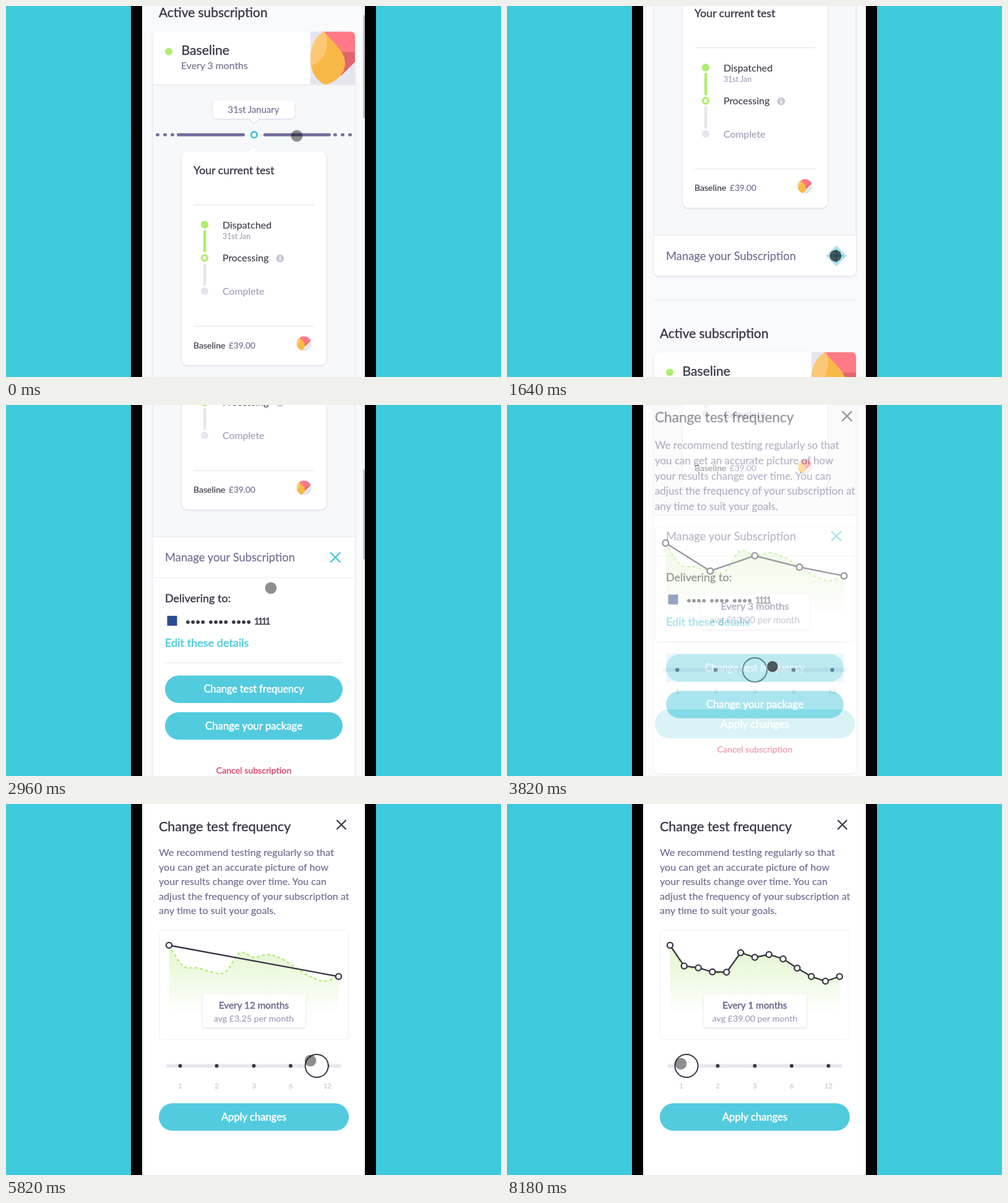
These frames come from a looping animation (800x600 px, 9.18 s). An HTML page:

```html
<!DOCTYPE html>
<html lang="en">
<head>
<meta charset="utf-8">
<title>Subscription settings</title>
<style>
  html, body { margin: 0; width: 100%; height: 100%; overflow: hidden; background: #3dcadc; }
  svg { display: block; width: 800px; height: 600px; }
  text { font-family: Lato, "Open Sans", sans-serif; stroke-linejoin: round; white-space: pre; }
  .shade { filter: drop-shadow(0 1px 1.5px rgba(70, 70, 120, .2)); }
</style>
</head>
<body>
<svg id="stage" viewBox="0 0 800 600"></svg>
<script>
const LOOP = 9180;
const INK = '#3a3747', MUTED = '#6d6a8f', PALE = '#9d9cb6', TEAL = '#52cbde',
      LIME = '#aeee70', RULE = '#e5e6ee', GREY = '#e6e5ec';
const PANEL = 351.5;

// Markup helpers; bold is an outline width that thickens the regular face.
const text = (x, y, size, fill, str, bold = 0, anchor = 'start', extra = '') =>
  `<text x="${x}" y="${y}" font-size="${size}" fill="${fill}" stroke="${fill}" stroke-width="${bold}" text-anchor="${anchor}" ${extra}>${str}</text>`;
const rect = (x, y, w, h, fill, rx = 0, extra = '') =>
  `<rect x="${x}" y="${y}" width="${w}" height="${h}" rx="${rx}" fill="${fill}" ${extra}/>`;
const dot = (x, y, r, fill, extra = '') =>
  `<circle cx="${x}" cy="${y}" r="${r}" fill="${fill}" ${extra}/>`;
const rule = (x1, x2, y, color = RULE) => rect(x1, y - .6, x2 - x1, 1.2, color);
const path = (d, fill, extra = '') => `<path d="${d}" fill="${fill}" ${extra}/>`;
const range = n => [...Array(n).keys()];

const art = `
  <g clip-path="url(#artClip)">
    ${rect(492, 42, 72, 86.5, '#e6e5ef')}
    ${path('M512 42H564V91L541 114Z', '#ff7986')}
    ${path('M541 75H564V91L541 114Z', '#e3646f')}
    ${path('M514 42C499 50 492 68 492 86C492 104 500 122 516 128C534 124 548 110 548 93C548 74 530 62 514 42Z', '#f9b947')}
    ${path('M514 42C499 50 492 68 492 86Q492 92 493.5 97C512 90 523 72 517.5 46Z', '#fdc978')}
    ${path('M514 42C499 50 492 68 492 86C492 104 500 122 516 128C534 124 548 110 548 93C548 74 530 62 514 42Z', 'url(#grain)')}
  </g>`;

const head = `
  ${text(247, 19, 20.9, INK, 'Active subscription', .4)}
  ${dot(263, 74.5, 6, LIME)}
  ${text(283.5, 80, 21.2, INK, 'Baseline', .35)}
  ${text(283, 102.5, 15.8, MUTED, 'Every 3 months', .1)}
  ${art}`;

const timeline = `
  <g class="shade">${path('M339.5 153H461.5Q466.5 153 466.5 158V178Q466.5 183 461.5 183H408L401 189.5L394 183H339.5Q334.5 183 334.5 178V158Q334.5 153 339.5 153Z', '#fff')}</g>
  ${text(400, 174, 14.9, MUTED, '31st January', .1, 'middle')}
  ${[245, 257, 269, 532, 544, 556].map(x => rect(x - 3, 206.5, 6, 5, '#716f9c', 2.5)).join('')}
  ${rect(276, 206.5, 110, 5, '#716f9c', 2.2)}${rect(416, 206.5, 109, 5, '#716f9c', 2.2)}
  ${dot(401, 209, 4.7, '#fff', `stroke="#48c6da" stroke-width="3"`)}`;

const testCard = `
  <g class="shade">
    ${rect(284, 236, 234, 345.5, '#fff', 9)}
    ${path('M392 236.5L400 228.5L408 236.5Z', '#fff')}
  </g>
  ${text(303, 273, 17.8, INK, 'Your current test', .35)}
  ${rule(303.5, 498, 322.5)}
  ${rect(319, 363, 4.5, 36.5, LIME, 2)}${rect(319, 417, 4.5, 36.5, GREY, 2)}
  ${dot(321, 354.5, 6.2, LIME)}
  ${dot(321, 408.3, 4.6, '#fff', `stroke="${LIME}" stroke-width="3.2"`)}
  ${dot(321, 461.8, 6, GREY)}
  ${text(350, 360.5, 16, INK, 'Dispatched', .1)}
  ${text(350, 378, 12.4, PALE, '31st Jan', .1)}
  ${text(350, 414, 15.9, INK, 'Processing', .1)}
  ${dot(443, 409, 6.4, '#cbcad5')}${dot(443, 406, 1, '#fff')}${rect(442, 408, 2, 4.5, '#fff')}
  ${text(350, 467.8, 15.9, PALE, 'Complete', .1)}
  ${rule(303.5, 498, 518.5)}
  ${text(303, 554.3, 14.1, INK, 'Baseline', .15)}
  ${text(360, 554.3, 13.7, MUTED, '£39.00', .1)}
  <g clip-path="url(#badgeClip)">
    ${rect(469, 534, 26, 26, GREY)}
    ${path('M472 534H495V540L481 553Z', '#ff7986')}
    ${path('M483 547L493 541L481 553Z', '#e3646f')}
    ${path('M474 537C479 542 484 545 483 551Q481 557 475 559H468V537Z', '#f9b947')}
    ${path('M474 537H468V550C474 548 476 543 474 537Z', '#fdc978')}
  </g>`;

const button = (y, label, size) =>
  rect(257, y, 287, 44.5, TEAL, 22.2) + text(400.5, y + 28, size, '#fff', label, .5, 'middle');

const panel = `
  <g clip-path="url(#panelClip)">
    ${rule(238, 563, 691.5)}
    ${text(257, 732, 18, INK, 'Delivering to:', .4)}
    ${rect(260.5, 753.5, 16, 16, '#2b4a94')}
    ${range(12).map(i => dot(294 + 8.1 * (i % 4) + 37 * Math.floor(i / 4), 763.6, 2.9, INK)).join('')}
    ${text(400.5, 768, 16, INK, '1111', .3, 'start', 'letter-spacing="-3.3"')}
    ${text(257, 804, 18.1, TEAL, 'Edit these details', .6)}
    ${rule(257, 544, 829.5)}
    ${button(850, 'Change test frequency', 16.3)}
    ${button(909.3, 'Change your package', 16.8)}
    ${rect(257, 849, 287, 46, '#a9dde8', 0, 'id="tap" opacity="0"')}
    ${text(400.5, 1008.5, 14.2, '#d9476a', 'Cancel subscription', .4, 'middle')}
  </g>`;

const page = `
  ${rect(220, 0, 360, 600, '#f9fafc')}
  <g id="page">
    <g class="shade">${rect(237.5, 42, 326.5, 650, '#fff', 8, 'id="card"')}</g>
    <g id="head">${head}</g>
    ${rect(237.5, 128, 326.5, 497.5, '#f7f8fa')}
    ${rule(237.5, 564, 128.5)}${rule(237.5, 564, 625.5)}
    ${rect(237, 128, 1, 498, '#ecedf3')}${rect(563.3, 128, 1, 498, '#ecedf3')}
    ${timeline}${testCard}
    ${text(257, 666, 18.4, MUTED, 'Manage your Subscription', .1)}
    <g id="icon">
      ${rect(-12, -12, 24, 24, '#b4e2ee', 0, 'id="glow" transform="rotate(45)"')}
      <path d="M-11.3 0H11.3M0 -11.3V11.3" stroke="${TEAL}" stroke-width="2.5"/>
    </g>
    ${panel}
    <g id="next">
      ${rule(237.5, 564, 730.5)}
      <g class="shade">${rect(237.5, 815, 326.5, 650, '#fff', 8)}</g>
      <use href="#head" y="773"/>
    </g>
  </g>
  ${rect(577, 14, 3, 167, '#c3c3c8', 1.5, 'id="bar"')}`;

// Chart: one reading per month.
const readings = [228.5, 262, 265, 271.5, 272, 240.5, 248, 243.5, 250.5, 265.5, 279, 286.5, 279]
  .map((y, i) => [263.5 + i * 274 / 12, y]);
const steps = [[1, 281.5], [2, 340.5], [3, 400.5], [6, 460], [12, 519.5]];

function smoothPath(p) {
  let d = 'M' + p[0];
  for (let i = 0; i < p.length - 1; i++) {
    const a = p[i - 1] || p[i], b = p[i], c = p[i + 1], e = p[i + 2] || c;
    d += `C${b[0] + (c[0] - a[0]) / 6} ${b[1] + (c[1] - a[1]) / 6} ${c[0] - (e[0] - b[0]) / 6} ${c[1] - (e[1] - b[1]) / 6} ${c}`;
  }
  return d;
}
const curve = smoothPath(readings);

const advice = ['We recommend testing regularly so that', 'you can get an accurate picture of how',
  'your results change over time. You can', 'adjust the frequency of your subscription at',
  'any time to suit your goals.'];

const modal = `
  <g id="modal">
    ${rect(200, -40, 400, 680, '#fff')}
    ${text(247, 43.5, 21.5, INK, 'Change test frequency', .4)}
    <path d="M534.5 26L549.5 41M549.5 26L534.5 41" stroke="${INK}" stroke-width="2.2"/>
    ${advice.map((s, i) => text(247, 84.3 + 23.4 * i, 16.15, MUTED, s, .15)).join('')}
    ${rect(247.5, 203.5, 306, 177.5, '#fff', 5, 'stroke="#eef3f5" stroke-width="1.2"')}
    ${path(curve + 'V338H263.5Z', 'url(#fade)')}
    ${path(curve, 'none', `stroke="${LIME}" stroke-width="2.3" stroke-dasharray="4.6 4"`)}
    <g id="plot" stroke="${INK}" stroke-width="2.3" fill="#fff"></g>
    <g class="shade">${rect(318, 307.5, 166.5, 54, '#fff', 4)}</g>
    ${text(400.5, 330.5, 15.3, MUTED, '', .5, 'middle', 'id="every"')}
    ${text(400.5, 352, 14.2, PALE, '', .15, 'middle', 'id="price"')}
    ${rect(259, 420.5, 283, 6, '#e8e7ef', 3)}
    ${steps.map(([n, x]) => dot(x, 423.5, 3, INK) + text(x, 460.3, 11.3, '#c6c5cf', n, .15, 'middle')).join('')}
    ${dot(0, 423.5, 18.6, '#fff', `id="knob" stroke="${INK}" stroke-width="2"`)}
    ${rect(247, 484, 307, 44.5, TEAL, 22.2, 'id="apply"')}
    ${text(400.5, 512.3, 16.6, '#fff', 'Apply changes', .5, 'middle')}
  </g>`;

document.getElementById('stage').innerHTML = `
  <defs>
    <clipPath id="screen">${rect(220, 0, 360, 600, '#000')}</clipPath>
    <clipPath id="artClip"><path d="M490 42H556Q564 42 564 50V128.5H490Z"/></clipPath>
    <clipPath id="badgeClip">${dot(481.7, 546.7, 11.8, '#000')}</clipPath>
    <clipPath id="panelClip">${rect(237, 691, 328, 0, '#000', 0, 'id="panelBox"')}</clipPath>
    <pattern id="grain" width="5" height="5" patternUnits="userSpaceOnUse" patternTransform="rotate(30)">
      ${dot(1.5, 1.5, .6, '#d99a3a', 'opacity=".55"')}
    </pattern>
    <linearGradient id="fade" gradientUnits="userSpaceOnUse" x1="0" x2="0" y1="228" y2="338">
      <stop offset="0" stop-color="#e4f7d0"/><stop offset=".45" stop-color="#eefae2"/>
      <stop offset="1" stop-color="#fff"/>
    </linearGradient>
  </defs>
  ${rect(0, 0, 800, 600, '#3dcadc')}
  ${rect(202, 0, 396, 600, '#000')}
  <g clip-path="url(#screen)">${page}${modal}</g>
  ${dot(0, 0, 9.4, '#000', 'id="cursor"')}`;

const $ = id => document.getElementById(id);
const set = (id, name, value) => $(id).setAttribute(name, value);
const clamp = v => Math.min(1, Math.max(0, v));
const part = (t, a, b) => clamp((t - a) / (b - a));
const smooth = p => p * p * (3 - 2 * p);
const easeOut = p => 1 - (1 - p) ** 3;

// Eased value at t from rows of [time, ...values].
function track(t, rows, col = 1) {
  const i = rows.findIndex(r => r[0] > t);
  if (i < 0) return rows[rows.length - 1][col];
  if (i === 0) return rows[0][col];
  const a = rows[i - 1], b = rows[i];
  return a[col] + (b[col] - a[col]) * smooth(part(t, a[0], b[0]));
}

const cursorRows = [[0, 470, 210], [260, 476, 105], [650, 480, 112], [1450, 531, 404], [1800, 531, 404],
  [2350, 438, 453], [2400, 438, 453], [2960, 428, 296], [3120, 428, 288], [3560, 429, 423], [4000, 429, 423],
  [4550, 391, 418], [4750, 391, 418], [5200, 450, 416], [5500, 451, 415], [6000, 509, 415],
  [6230, 509, 416], [8030, 281, 420]];
const knobRows = [[4750, 400.5], [5200, 460], [5500, 460.5], [6000, 519.5], [6230, 519.5], [8030, 290]];
const barRows = [[1100, 1], [1400, 0], [2420, 0], [2540, 1], [3350, 1], [3600, 0]];

const scrollAt = t => 255 * easeOut(part(t, 0, 1000))
  + 157 * part(t, 2400, 2960) ** 2 + 35 * easeOut(part(t, 2960, 3150));

let shown = 0;
function plan(n) {
  if (n === shown) return;
  shown = n;
  const pts = readings.filter((_, i) => i % n === 0);
  $('plot').innerHTML = `<polyline points="${pts.join(' ')}" fill="none"/>`
    + pts.map(([x, y]) => `<circle cx="${x}" cy="${y}" r="4.6"/>`).join('');
  $('every').textContent = `Every ${n} months`;
  $('price').textContent = `avg £${(39 / n).toFixed(2)} per month`;
  set('apply', 'opacity', n === 3 ? .42 : 1);
}

function draw(t) {
  const scroll = scrollAt(t);
  const open = smooth(part(t, 1720, 2020));
  set('page', 'transform', `translate(0 ${-scroll})`);
  set('card', 'height', 649.5 + PANEL * open);
  set('panelBox', 'height', PANEL * open);
  set('next', 'transform', `translate(0 ${PANEL * open})`);
  set('icon', 'transform', `translate(532.3 659) rotate(${45 * open})`);
  set('glow', 'opacity', t >= 1600 && t < 1800 ? 1 : 0);
  set('tap', 'opacity', t >= 3660 && t < 3950 ? .45 : 0);
  set('bar', 'y', 14 + .218 * scroll);
  set('bar', 'height', 167 - 21 * open);
  set('bar', 'opacity', track(t, barRows));

  const shownPart = part(t, 3700, 3940);
  const k = 1.106 - .106 * shownPart;
  set('modal', 'opacity', shownPart);
  set('modal', 'transform', `translate(400.5 329) scale(${k}) translate(-400.5 -329)`);
  const knob = track(t, knobRows);
  set('knob', 'cx', knob);
  plan(steps.reduce((a, b) => Math.abs(b[1] - knob) < Math.abs(a[1] - knob) ? b : a)[0]);

  const pressed = (t >= 1600 && t < 1740) || (t >= 3660 && t < 3860);
  const dragging = t > 2400 && t < 2960;
  set('cursor', 'cx', track(t, cursorRows));
  set('cursor', 'cy', dragging ? 708 - scroll : track(t, cursorRows, 2));
  set('cursor', 'fill-opacity', pressed ? .62 : .44);
  set('cursor', 'stroke', pressed && t > 3000 ? '#fff' : 'none');
}

const start = performance.now();
function tick() {
  draw((performance.now() - start) % LOOP);
  requestAnimationFrame(tick);
}
tick();
</script>
</body>
</html>
```
